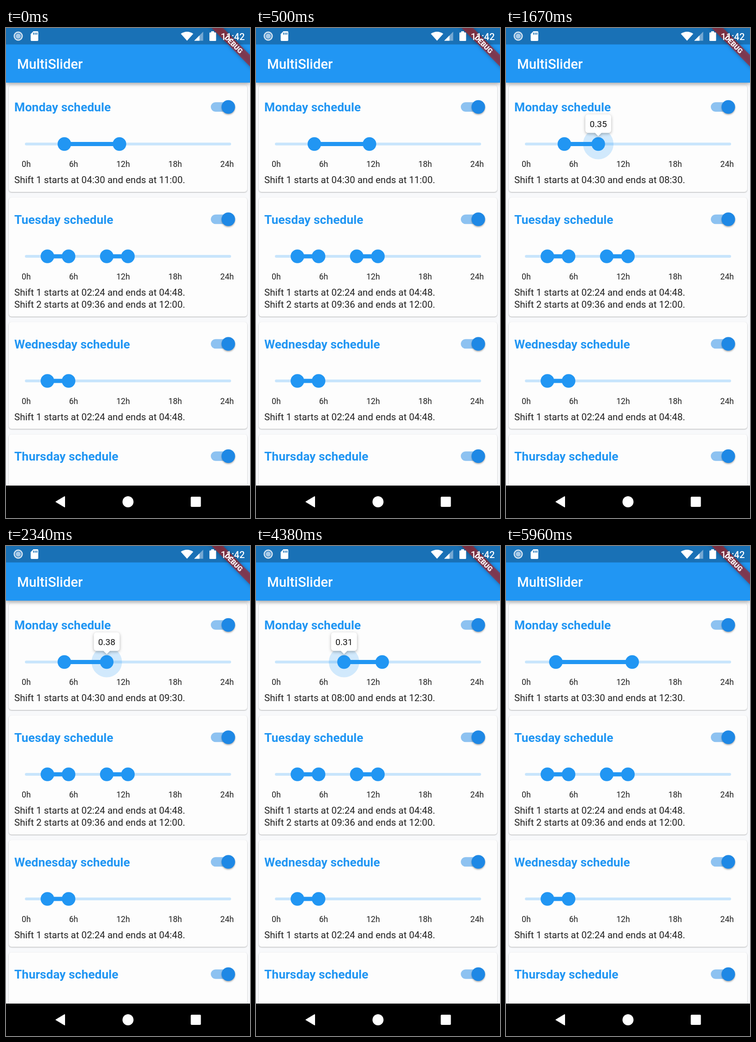
Recreate the animation shown at these times as an HTML page. Size 529 by 1058 pixels, loop 6 s.

```html
<!DOCTYPE html>
<html lang="en">
<head>
<meta charset="utf-8">
<title>MultiSlider</title>
<style>
  html, body { margin: 0; width: 100%; height: 100%; overflow: hidden; background: #f8f9fb; }
  svg { display: block; width: 529px; height: 1058px; font-family: Roboto, "Open Sans", sans-serif; }
  .card { fill: #fdfdfd; filter: drop-shadow(0 1.5px 1.2px rgba(0, 0, 0, .3)); }
  .title { font-size: 26.45px; font-weight: 700; fill: #2196f3; }
  .shift { font-size: 20.57px; fill: #212121; }
  .hour { font-size: 17.63px; fill: #212121; }
  .rail { stroke: #c8e5fc; stroke-width: 6; stroke-linecap: round; }
  .range { stroke: #2196f3; stroke-width: 9; }
  .thumb { fill: #2196f3; }
  .switch { fill: #1e88e5; }
  .switch circle { filter: drop-shadow(0 2px 1.5px rgba(0, 0, 0, .3)); }
  .bar { fill: #2196f3; filter: drop-shadow(0 3px 4px rgba(0, 0, 0, .35)); }
  .ribbon { fill: #b71c1c; fill-opacity: .63; filter: drop-shadow(0 0 4px rgba(0, 0, 0, .5)); }
  .bubble { fill: #fff; filter: drop-shadow(0 2px 3px rgba(0, 0, 0, .3)); }
</style>
</head>
<body>
<svg viewBox="0 0 529 1058">
  <g id="cards"></g>

  <circle id="halo" cy="250.5" fill="#2196f3" fill-opacity=".2"/>
  <g id="monday"></g>
  <g id="tip">
    <path class="bubble" d="M-22-64H22a6 6 0 0 1 6 6V-30a6 6 0 0 1-6 6H7L0-17-7-24H-22a6 6 0 0 1-6-6V-58a6 6 0 0 1 6-6Z"/>
    <text id="value" y="-36.7" text-anchor="middle" font-size="19.1" fill="#111"></text>
  </g>

  <rect class="bar" width="529" height="118"/>
  <rect width="529" height="35.5" fill="#1971b6"/>
  <text x="24" y="87.5" font-size="29.4" font-weight="500" fill="#fff">MultiSlider</text>

  <g transform="translate(529 0) rotate(45)">
    <rect class="ribbon" x="-70" y="41.2" width="140" height="17.6"/>
    <text y="55.3" text-anchor="middle" font-size="15" font-weight="900" fill="#fff">DEBUG</text>
  </g>

  <g fill="#fff">
    <circle cx="26.5" cy="17.5" r="10" fill="#d3e3f0"/>
    <circle cx="26.5" cy="17.5" r="6.3" fill="#a9cbe8" stroke="#4a8fc9" stroke-width="2"/>
    <path d="M59.5 7H68a2 2 0 0 1 2 2V26a2 2 0 0 1-2 2H55.500a2 2 0 0 1-2-2V13Z"/>
    <path d="M60 10v4.500M63.500 10v4.500M67 10v4.500" stroke="#1971b6" stroke-width="1.8"/>
    <path d="M392.500 27.500L379 12.500C387 6.500 398 6.500 406 12.500Z"/>
    <path d="M427.500 8V27.500H408Z" opacity=".4"/>
    <path d="M419.500 16V27.500H408Z"/>
    <path d="M445 7h6v2.500h3a1.500 1.500 0 0 1 1.500 1.500V26.500a1.500 1.500 0 0 1-1.500 1.500H442.500a1.500 1.500 0 0 1-1.500-1.500V11a1.500 1.500 0 0 1 1.500-1.500H445Z"/>
    <text x="465.500" y="25.500" font-size="20.6" font-weight="500">11:42</text>
  </g>

  <rect y="988" width="529" height="70"/>
  <g fill="#fff">
    <path d="M108.500 1023L127 1012V1034Z" stroke="#fff" stroke-width="2" stroke-linejoin="round"/>
    <circle cx="264.500" cy="1023" r="12"/>
    <rect x="400.500" y="1012" width="22" height="22" rx="2"/>
  </g>
</svg>
<script>
const LOOP = 6000, TIP_LAG = 60, FADE = 120, RAIL_Y = 250.5;
const $ = id => document.getElementById(id);
const clamp = v => Math.max(0, Math.min(1, v));
const hourX = h => 43.8 + h * 18.38;
const snap = h => Math.round(h * 2) / 2;

const clock = h => {
  const m = Math.round(h * 60), two = n => String(n).padStart(2, "0");
  return two(Math.floor(m / 60)) + ":" + two(m % 60);
};
const shiftText = (n, a, b) => `Shift ${n} starts at ${clock(a)} and ends at ${clock(b)}.`;

const slider = pairs => pairs.map(p => {
  const [a, b] = p.map(h => hourX(snap(h)));
  return `<line class="range" x1="${a}" x2="${b}" y1="${RAIL_Y}" y2="${RAIL_Y}"/>` +
    [a, b].map(x => `<circle class="thumb" cx="${x}" cy="${RAIL_Y}" r="14.7"/>`).join("");
}).join("");

const hourLabels = [0, 6, 12, 18, 24].map((h, i) =>
  `<text class="hour" x="${[34, 136.7, 239.2, 352, 464.5][i]}" y="300">${h}h</text>`).join("");

// Every card is laid out at Monday's position and shifted down by dy.
const card = (day, dy, height, shifts) => `<g transform="translate(0 ${dy})">
  <rect class="card" x="6" y="123.500" width="517" height="${height}" rx="6"/>
  <text class="title" x="18" y="180">${day} schedule</text>
  <g class="switch">
    <rect x="444" y="160.200" width="48.500" height="20.600" rx="10.300" opacity=".5"/>
    <circle cx="482" cy="170.500" r="14.700"/>
  </g>
  <line class="rail" x1="44" x2="485" y1="${RAIL_Y}" y2="${RAIL_Y}"/>
  ${hourLabels}
  ${slider(shifts)}
  ${shifts.map((s, i) => `<text class="shift" x="18" y="${335 + i * 26.5}">${shiftText(i + 1, ...s)}</text>`).join("")}
</g>`;

$("cards").innerHTML =
  card("Monday", 0, 230.5, []) + '<text class="shift" id="shift" x="18" y="335"></text>' +
  card("Tuesday", 242.5, 257, [[2.4, 4.8], [9.6, 12]]) +
  card("Wednesday", 511.5, 230.5, [[2.4, 4.8]]) +
  card("Thursday", 754, 230.5, []);

// Drags: press and release times, then [ms, hour] points of the finger.
const endDrag = { on: 1100, off: 3260, path: [[1150, 11], [1670, 8.4], [2000, 7], [2800, 13.2], [2960, 13.2], [3090, 12.6]] };
const startDrag = { on: 3520, off: 5520, path: [[3600, 4.5], [4380, 7.8], [4600, 8.6], [5300, 3.5]] };

function hourAt({ path }, t) {
  const i = path.findIndex(p => p[0] > t);
  if (i === 0) return path[0][1];
  if (i < 0) return snap(path[path.length - 1][1]);
  const [t0, h0] = path[i - 1], [t1, h1] = path[i];
  return snap(h0 + (h1 - h0) * (t - t0) / (t1 - t0));
}

const pressAt = ({ on, off }, t) => clamp((t - on) / FADE) * clamp((off - t) / FADE);

function draw(now) {
  const t = now % LOOP;
  const start = hourAt(startDrag, t), end = hourAt(endDrag, t);
  const drag = t < 3400 ? endDrag : startDrag;
  const x = hourX(hourAt(drag, t)), press = pressAt(drag, t);

  $("monday").innerHTML = slider([[start, end]]);
  $("shift").textContent = shiftText(1, start, end);
  $("halo").setAttribute("cx", x);
  $("halo").setAttribute("r", 33 * press);
  $("tip").style.display = press ? "" : "none";
  $("tip").setAttribute("transform", `translate(${x} ${RAIL_Y}) scale(${press})`);
  $("value").textContent = (hourAt(drag, t - TIP_LAG) / 24).toFixed(2);
  requestAnimationFrame(() => draw(performance.now() - t0));
}

const t0 = performance.now();
draw(0);
</script>
</body>
</html>
```
